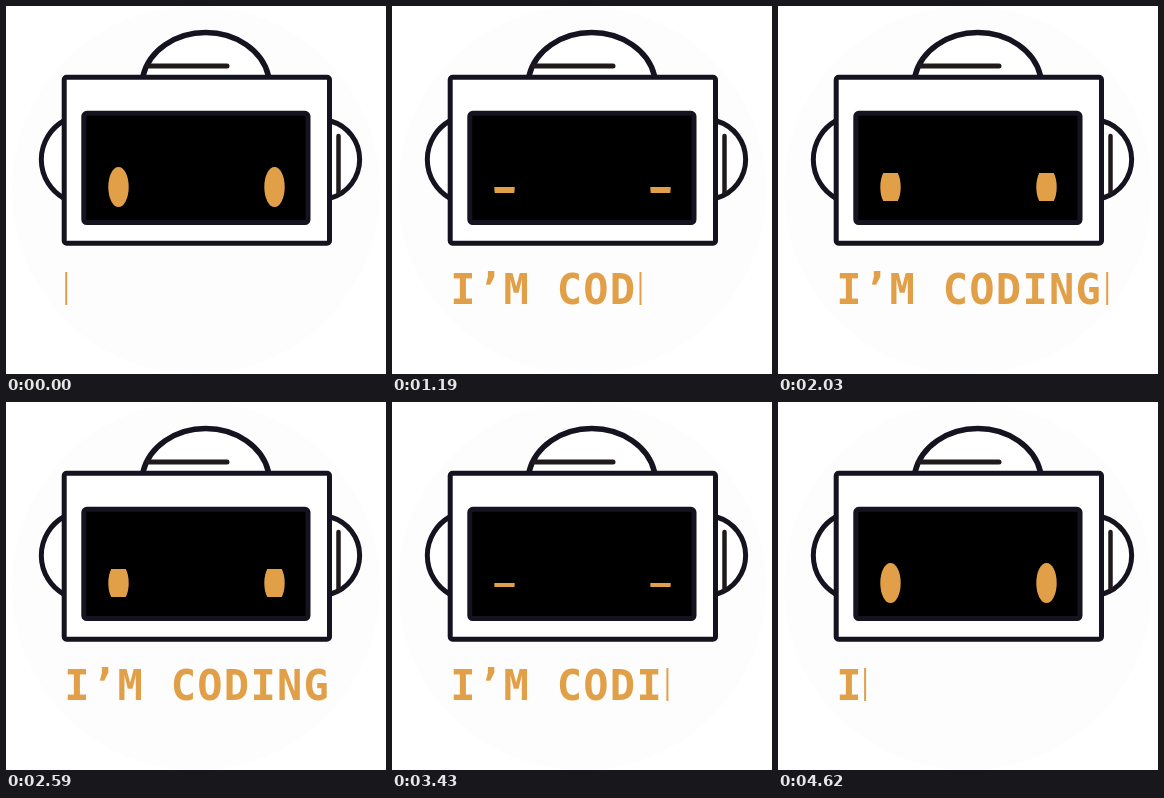
Animation, 380 px wide and 368 px high, one loop 4760 ms. Source, as an HTML page:

```html
<!DOCTYPE html>
<html lang="en">
<head>
<meta charset="utf-8">
<title>Coding robot</title>
<style>
  html, body { margin: 0; width: 100%; height: 100%; overflow: hidden; background: #fff; }
  svg { display: block; width: 100vw; height: 100vh; }
  .line { fill: none; stroke: #151320; stroke-width: 5; stroke-linecap: round; }
  .amber { fill: #e1a048; }
  text { font: bold 42px "DejaVu Sans Mono", monospace; letter-spacing: 1.3px; }
</style>
</head>
<body>
<svg viewBox="0 0 380 368" preserveAspectRatio="none">
  <defs>
    <clipPath id="lids"><rect id="gap" x="90" y="161" width="200" height="40"/></clipPath>
  </defs>
  <circle cx="190" cy="184" r="184" fill="#fdfdfd"/>

  <g class="line">
    <path d="M137 70A64 54 0 0 1 262.5 70" fill="#fff" stroke-width="5.5" stroke-linecap="butt"/>
    <path d="M142 60H221" stroke="#211a1d"/>
    <path d="M57.5 115A44.5 44.5 0 0 0 57.5 192" fill="#fff" stroke-linecap="butt"/>
    <path d="M324.5 115A40 40 0 0 1 324.5 192" fill="#fff" stroke-linecap="butt"/>
    <path d="M332.5 130V187" stroke="#211a1d" stroke-width="4.5"/>
    <rect x="58.2" y="71.3" width="265.3" height="166" rx="2.5" fill="#fff"/>
    <rect x="77.8" y="107.3" width="224.2" height="109.3" rx="3" fill="#000"/>
  </g>

  <g class="amber" clip-path="url(#lids)">
    <ellipse cx="112.5" cy="181" rx="10.2" ry="20"/>
    <ellipse cx="268.5" cy="181" rx="10.2" ry="20"/>
  </g>

  <text id="words" class="amber" x="58.3" y="298" xml:space="preserve"></text>
  <rect id="caret" class="amber" y="266" width="2" height="33"/>
</svg>
<script>
  const $ = id => document.getElementById(id);
  const words = $('words'), caret = $('caret'), gap = $('gap');

  const PHRASE = 'I’M CODING';
  const LOOP = 4760, BAR = 1190;
  const BEATS = [0, 210, 350, 560, 700, 840, 1050];

  // Top and bottom of the eye opening, from open to shut
  const LIDS = [[161, 201], [167, 195], [173, 191], [181, 187], [181, 185]];
  const BLINK = [0, 0, 0, 1, 1, 2, 2, 3, 4, 3, 2, 2, 1, 1, 0];

  function stepAt(ms) {
    const t = ms % LOOP, bar = Math.floor(t / BAR);
    return bar * 7 + BEATS.filter(b => b <= t - bar * BAR).length - 1;
  }

  function draw(step) {
    // The second half runs back through the first
    const pos = step <= 14 ? step : 28 - step;
    const count = Math.min(pos, PHRASE.length);
    words.textContent = PHRASE.slice(0, count);

    // A trailing blank moves the caret only half a cell
    const cells = PHRASE[count - 1] === ' ' ? count - 0.5 : count;
    caret.setAttribute('x', 59.2 + cells * 26.9);
    caret.style.visibility = pos > 10 && pos % 2 ? 'hidden' : 'visible';

    const [top, bottom] = LIDS[BLINK[pos]];
    gap.setAttribute('y', top);
    gap.setAttribute('height', bottom - top);
  }

  const start = performance.now();
  let last = 0;
  function tick() {
    const step = stepAt(performance.now() - start);
    if (step !== last) draw(last = step);
    requestAnimationFrame(tick);
  }
  draw(0);
  requestAnimationFrame(tick);
</script>
</body>
</html>
```
